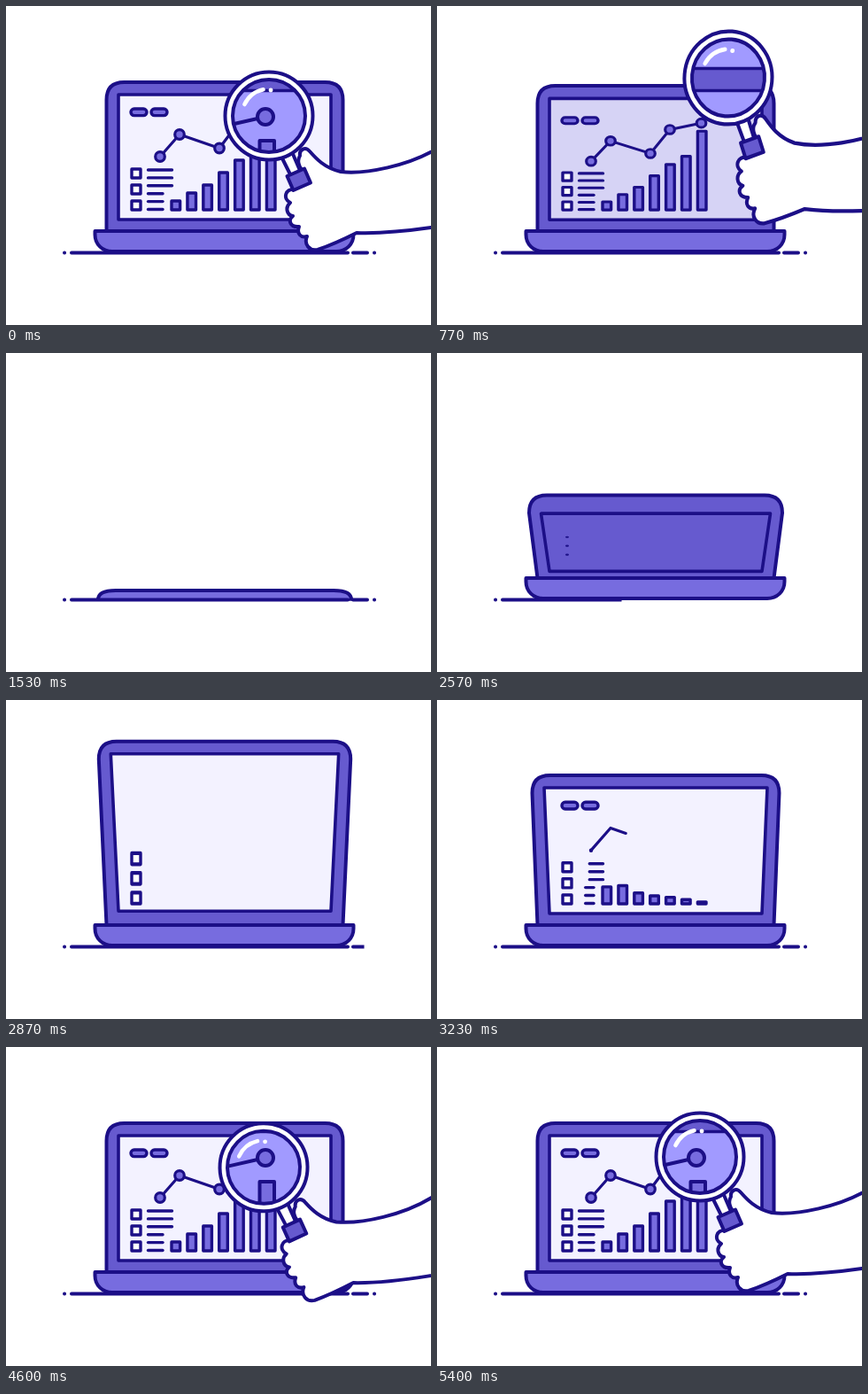
These frames come from a looping animation (480x360 px, 5.43 s). An HTML page with a canvas:

```html
<!DOCTYPE html>
<html>
<head>
<meta charset="utf-8">
<style>
html, body { margin: 0; width: 100%; height: 100%; overflow: hidden; background: #fff; }
canvas { display: block; }
</style>
</head>
<body>
<canvas id="stage" width="480" height="360"></canvas>
<script>
const c = document.getElementById('stage').getContext('2d');
const LOOP = 5430;
const INK = '#1c0f87', LID = '#665acf', BASE = '#776cdf', SCREEN = '#f3f2ff', GLASS = '#a19aff';
let t = 0;

// Smooth monotone curve through [time, value] pairs.
function curve(keys, at = t) {
  const n = keys.length;
  if (at <= keys[0][0]) return keys[0][1];
  if (at >= keys[n - 1][0]) return keys[n - 1][1];
  let i = 0;
  while (at >= keys[i + 1][0]) i++;
  const slope = j => j < 0 || j > n - 2 ? 0 : (keys[j + 1][1] - keys[j][1]) / (keys[j + 1][0] - keys[j][0]);
  const tangent = j => {
    const a = slope(j - 1), b = slope(j);
    return a * b <= 0 ? 0 : 2 * a * b / (a + b);
  };
  const [t0, a] = keys[i], [t1, b] = keys[i + 1], d = t1 - t0, u = (at - t0) / d;
  return a + (b - a) * u * u * (3 - 2 * u)
    + d * u * (1 - u) * ((1 - u) * tangent(i) - u * tangent(i + 1));
}

// Progress of a part that appears while the laptop opens.
const appear = (start, length) => t < 2000 ? 1 : curve([[start, 0], [start + length, 1]]);

function paint(path, fill, stroke = INK, width = 4) {
  if (fill) { c.fillStyle = fill; c.fill(path); }
  if (stroke) { c.strokeStyle = stroke; c.lineWidth = width; c.stroke(path); }
}
const shape = (d, fill, stroke, width) => paint(new Path2D(d), fill, stroke, width);
function disc(x, y, r, fill, stroke, width) {
  const p = new Path2D();
  p.arc(x, y, r, 0, 7);
  paint(p, fill, stroke, width);
}
function layer(draw) { c.save(); draw(); c.restore(); }

function ground() {
  const from = t < 2200 ? curve([[1560, 60], [1720, 95], [1950, 300], [2150, 422]]) : 60;
  const to = t < 2200 ? 422 : curve([[2220, 60], [2300, 96], [2570, 208], [2830, 390], [2960, 422]]);
  if (to <= from) return;
  layer(() => {
    c.beginPath();
    c.rect(from, 270, to - from, 20);
    c.clip();
    shape('M66 278.5h.1M74 278.5H386M392 278.5H408M416 278.5h.1');
  });
}

const POINTS = [[174, 170], [196, 145], [241, 160.5], [263, 131], [298.5, 123]];
const BARS = [10, 19, 28, 42, 56, 66, 97];

function trend() {
  let left = 153.5 * appear(3060, 440);
  if (left <= 0) return;
  const p = new Path2D();
  p.moveTo(...POINTS[0]);
  for (let i = 1; i < POINTS.length && left > 0; i++) {
    const [x, y] = POINTS[i - 1], dx = POINTS[i][0] - x, dy = POINTS[i][1] - y;
    const len = Math.hypot(dx, dy), u = Math.min(1, left / len);
    p.lineTo(x + dx * u, y + dy * u);
    left -= len;
  }
  paint(p, null, INK, 3.2);
  POINTS.forEach(([x, y], i) => {
    const r = 5.3 * appear(3205 + 160 * i, 120);
    if (r > .2) disc(x, y, r, BASE, INK, 3.2);
  });
}

function barChart() {
  BARS.forEach((full, i) => {
    const u = t < 2000 ? 999 : t - 2810 - 60 * i;
    const grow = curve([[0, 0], [180, .13], [240, .21], [300, .43], [360, .95], [420, 1.1], [600, 1]], u);
    const h = full * grow + curve([[330, 0], [420, 8], [540, 0]], u);
    if (h > .3) shape(`M${187 + 17.9 * i} 230h9.6v${-h}h-9.6z`, BASE, INK, 3.4);
  });
}

function listAndTabs() {
  for (let i = 0; i < 3; i++) {
    const r = 5 * appear(2530, 300);
    if (r > .1) shape(`M${147 - r} ${189 + 18 * i - r}h${2 * r}v${2 * r}h${-2 * r}z`, '#fff', INK, 3.4);
  }
  for (let i = 0; i < 6; i++) {
    const end = i < 3 ? 187.5 : 177, len = (end - 160.5) * appear(3090, 260);
    if (len > .2) shape(`M${end} ${185 + 8.9 * i}h${-len}`, null, INK, 3.4);
  }
  for (const x of [150, 173]) {
    const w = 9 * appear(2880, 220);
    if (w < 1) continue;
    const p = new Path2D();
    p.roundRect(x - w, 116, 2 * w, 7.6, 3.8);
    paint(p, BASE, INK, 3.4);
  }
}

function laptop() {
  const sink = curve([[1250, 0], [1530, 26], [1670, 46], [2270, 46], [2470, 0]]);
  if (sink > 43) return;
  const h = curve([[640, 167], [770, 163], [950, 133], [1130, 62], [1240, 11], [2400, 11],
    [2570, 92], [2700, 165], [2850, 207], [3050, 178], [3230, 168], [3430, 167]]);
  const wide = curve([[790, 0], [1230, 9.5], [2600, 9.5], [3230, 6], [3500, 0]]);
  const on = curve([[640, 1], [770, .8], [1080, 0], [2570, 0], [2830, 1]]);
  const ink = curve([[850, 1], [1080, 0], [2480, 0], [2560, 1]]);
  const s = h / 167, top = 253 - h, r = Math.min(20, h * .95);
  layer(() => {
    c.beginPath();
    c.rect(0, 0, 480, 279.5);
    c.clip();
    c.translate(0, sink);
    const L = 113.5 - wide, R = 380.5 + wide;
    shape(`M113.5 254L${L} ${top + r}Q${L} ${top} ${L + 20} ${top}H${R - 20}Q${R} ${top} ${R} ${top + r}L380.5 254z`,
      h < 14 ? BASE : LID);
    const inTop = top + 14 + Math.max(0, 1 - s) * 15, inBottom = 253 - 12 * s;
    if (inBottom - inTop > 6) {
      const view = new Path2D(`M127 ${inBottom}L${127 - wide} ${inTop}H${367 + wide}L367 ${inBottom}z`);
      c.globalAlpha = on;
      paint(view, SCREEN, null);
      c.globalAlpha = 1;
      paint(view, null, INK, 3.6);
      if (ink > 0) layer(() => {
        c.clip(view);
        c.globalAlpha = ink;
        c.translate(0, 231);
        c.scale(1, t < 2000 ? s ** 3.6 : s);
        c.translate(0, -231);
        listAndTabs();
        barChart();
        trend();
      });
    }
    shape('M100.5 254H392.5V258C392.5 269 384 277 373 277H120C109 277 100.5 269 100.5 258z', BASE);
  });
}

// Enlarged scene, seen only through the glass.
function enlarged() {
  c.fillStyle = GLASS;
  c.fillRect(0, 0, 480, 360);
  shape('M60 70.5H388Q418 70.5 418 100V300H60z', LID, INK, 3.6);
  shape('M80 95.5H393.5V290H80z', GLASS, INK, 3.6);
  shape('M286.5 190V152H303V190', BASE);
  shape('M240 137L293 125');
  disc(293, 125, 9, BASE);
}

// Pose: handle x, handle y, angle in degrees, width scale, height scale.
const POSES = [
  [0, 330, 196, 0, 1, 1],
  [570, 337, 180, 2, 1, 1.02],
  [770, 355, 160, 5, 1, 1.06],
  [950, 430, 151, 11, .92, 1.1],
  [1140, 560, 160, 20, .8, 1.15],
  [3420, 575, 196, 30, .75, 1.2],
  [3650, 490, 184, 23, .82, 1.18],
  [3930, 397, 184, 15, .88, 1.15],
  [4250, 338, 194, 3, .97, 1.04],
  [4530, 325, 205, -1, 1, 1],
  [4780, 327, 211, -1, 1, 1],
  [5110, 330, 203, 0, 1, 1],
  [5400, 330, 196, 0, 1, 1]
];

function hand() {
  if (t > 1140 && t < 3420) return;
  const [x, y, angle, sx, sy] = [1, 2, 3, 4, 5].map(k => curve(POSES.map(p => [p[0], p[k]])));
  layer(() => {
    c.translate(x, y);
    c.rotate(angle * Math.PI / 180);
    c.scale(sx, sy);
    c.translate(-330, -196);
    shape('M640 95L490 159C455 181 405 190 378 187C360 183 350 172 343 164C338 158 331 162 332 169'
      + 'C328 175 331 181 335 186L340 200L325 207C316 206 312 217 321 222'
      + 'C315 227 317 236 324 237C318 242 321 250 331 249C328 257 333 262 340 260'
      + 'C336 269 343 277 352 275C367 270 382 263 396 256C424 257 452 254 480 250L640 225', '#fff');
    shape('M312 172L322 192L333 188L324 167', '#fff');
    shape('M317.5 192L337 183.5L344 199.5L324.5 208z', LID);
    disc(297, 124, 49.5, '#fff');
    const glass = new Path2D();
    glass.arc(297, 124, 41, 0, 7);
    layer(() => {
      c.clip(glass);
      c.resetTransform();
      enlarged();
    });
    paint(glass, null);
    const shine = new Path2D();
    shine.arc(297, 124, 30.5, 3.58, 4.5);
    paint(shine, null, '#fff', 4.5);
    shape('M299 95h.1', null, '#fff', 4.8);
  });
}

function frame(now) {
  t = now % LOOP;
  c.fillStyle = '#fff';
  c.fillRect(0, 0, 480, 360);
  c.lineCap = c.lineJoin = 'round';
  laptop();
  ground();
  hand();
  requestAnimationFrame(frame);
}
const start = performance.now();
const tick = frame;
frame = now => tick(Math.max(0, now - start));
frame(start);
</script>
</body>
</html>
```
